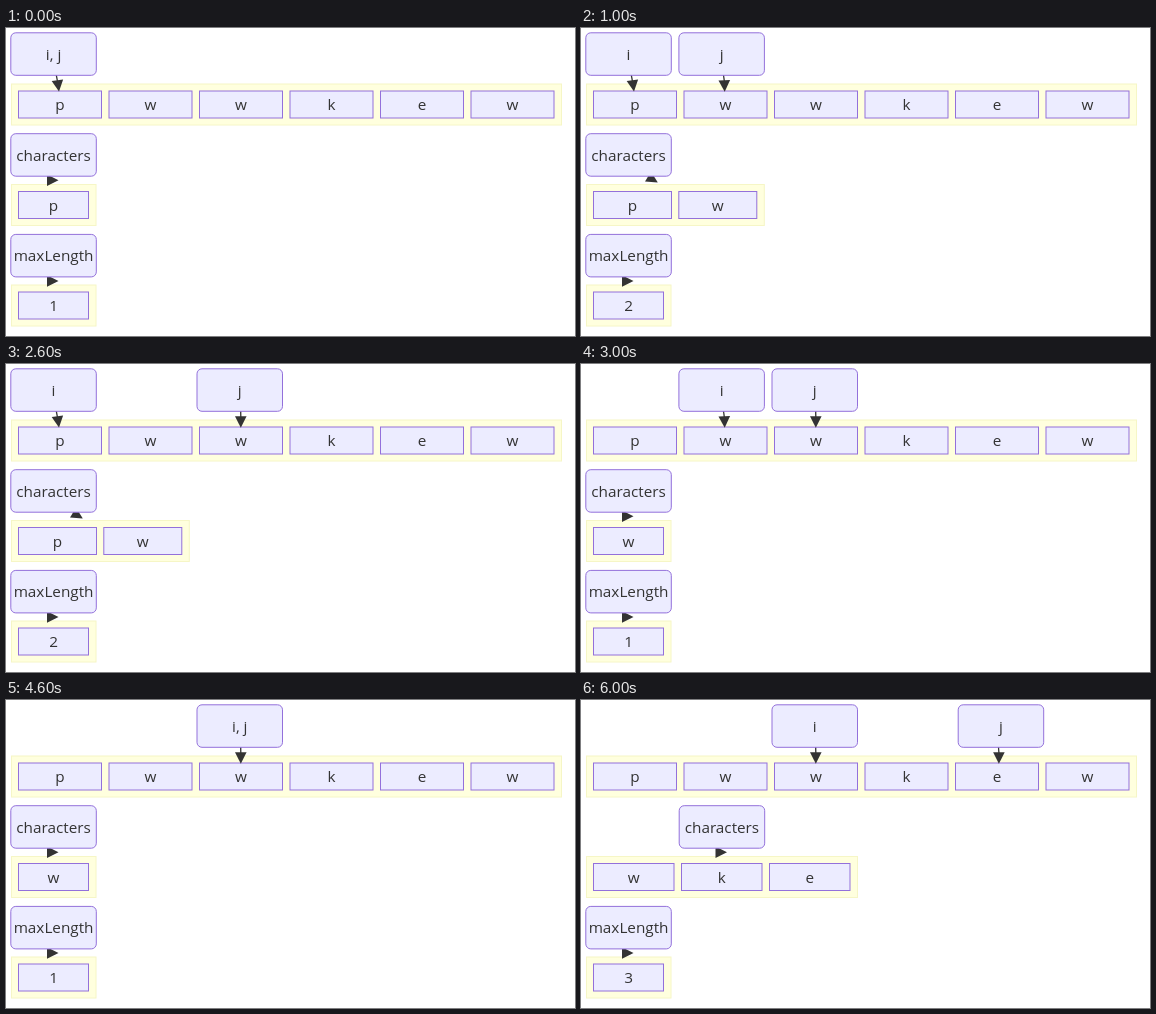
Recreate the animation shown at these times as an HTML page. Size 569 by 308 pixels, loop 7000 ms.

```html
<!DOCTYPE html>
<html lang="en">
<head>
<meta charset="utf-8">
<title>Sliding window</title>
<style>
html, body { margin: 0; width: 100%; height: 100%; overflow: hidden; background: #fff; }
svg { display: block; }
.cluster { fill: #ffffde; stroke: #f6f6c6; }
.node { fill: #ececff; stroke: #9370db; }
.edge { fill: none; stroke: #333; stroke-width: 1.3; }
.head { fill: #333; }
text { font: 15.3px "Open Sans", "Noto Sans", sans-serif; fill: #333; text-anchor: middle; }
</style>
</head>
<body>
<svg id="stage" width="569" height="308" viewBox="0 0 569 308"></svg>
<script>
const STEP = 1000;
const word = "pwwkew";
// i, j: window bounds; the third value is maxLength
const steps = [
  [0, 0, 1], [0, 1, 2], [0, 2, 2], [1, 2, 1], [2, 2, 1], [2, 3, 2], [2, 4, 3]
];
// cell width and pitch for one, two or three characters
const layouts = { 1: [70, 85], 2: [78, 85.3], 3: [80.5, 88] };
const stage = document.getElementById("stage");

const rect = (kind, x, y, w, h, r = 0) =>
  `<rect class="${kind}" x="${x}" y="${y}" width="${w}" height="${h}" rx="${r}"/>`;
const label = (s, x, y) => `<text x="${x}" y="${y}">${s}</text>`;
const box = (s, x, y, w, h, r) =>
  rect("node", x, y, w, h, r) + label(s, x + w / 2, y + h / 2 + 5.6);
const pointer = (s, x, y) => box(s, x, y, 85.5, 42.5, 5);
const head = (x, y, angle) =>
  `<path class="head" d="M0-5.8L11.5 0L0 5.8Z" transform="translate(${x} ${y}) rotate(${angle})"/>`;

function row(chars, y, w, pitch) {
  const total = (chars.length - 1) * pitch + w + 15;
  return rect("cluster", 5.5, y, total - 0.5, 41) +
    [...chars].map((c, k) => box(c, 12.5 + k * pitch, y + 7, w, 27)).join("");
}

function indexArrow(k) {
  const x0 = [50.3, 142.5, 234.7, 326.3, 417.5][k];
  const x1 = [51.4, 143.3, 234.8, 326, 417.9][k];
  const angle = [82, 88, 90, 90, 90][k];
  return `<path class="edge" d="M${x0} 47L${x1} 53"/>` + head(x1, 52.2, angle);
}

function scene([i, j, max]) {
  const wide = j === 4;
  const chars = j === 2 ? (i === 0 ? "pw" : "w") : word.slice(i, j + 1);
  const n = chars.length;
  const names = i === j ? [["i, j", i]] : [["i", i], ["j", j]];
  const charArrow = n === 2 ? head(67, 148.6, 31) : head(wide ? 134.5 : 41, 152.2, 0);
  return row(word, 56, 83, 90.5) +
    row(chars, 156.5, ...layouts[n]) +
    row(String(max), 257, 70, 85) +
    names.map(([, k]) => indexArrow(k)).join("") +
    charArrow + head(41, 253, 0) +
    names.map(([s, k]) => pointer(s, 4.8 + k * 93.1, 4.8)).join("") +
    pointer("characters", wide ? 98.2 : 4.8, 105.7) +
    pointer("maxLength", 4.8, 206.4);
}

const scenes = steps.map(scene);
let shown = -1;
const start = performance.now();
function draw(now) {
  const k = Math.floor(Math.max(0, now - start) / STEP) % scenes.length;
  if (k !== shown) stage.innerHTML = scenes[shown = k];
  requestAnimationFrame(draw);
}
draw(start);
</script>
</body>
</html>
```
